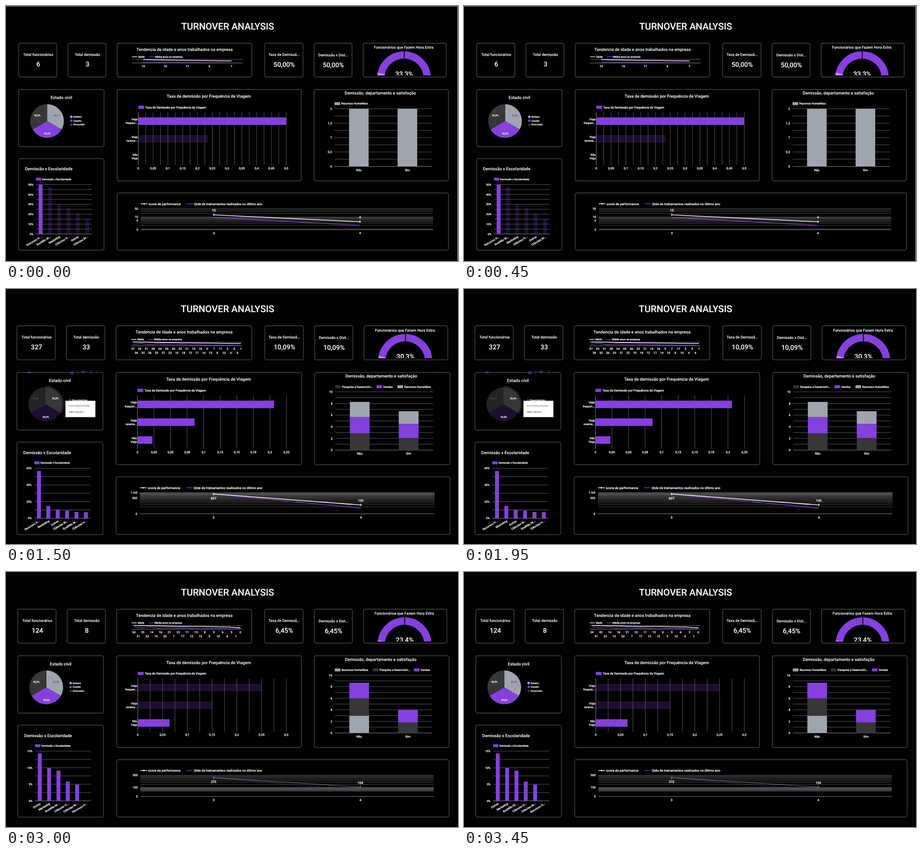
Write an HTML page that moves like this. It is 996 by 562 pixels and loops after 3750 ms.

```html
<!DOCTYPE html>
<html lang="pt">
<head>
<meta charset="utf-8">
<title>Turnover Analysis</title>
<style>
html, body { margin: 0; width: 100%; height: 100%; overflow: hidden; background: #020202; }
svg { display: block; width: 996px; height: 562px; font-family: Roboto, sans-serif; text-rendering: geometricPrecision; }
</style>
</head>
<body>
<svg id="stage" viewBox="0 0 996 562"></svg>
<script>
const HOLD = 750;
const PAL = { p: '#8540de', g: '#a0a4af', d: '#373737' };
const DIM = 0.22;
const GRID = '#5a5a5a', AXIS = '#8a8a8a';
const STATUS = { p: 'Casado', g: 'Solteiro', d: 'Divorciado' };
const DEPT = {
  p: ['Vendas', 46],
  g: ['Recursos HumaNãos', 83.5],
  d: ['Pesquisa e Desenvolvi...', 90]
};
const TRAVEL = { f: ['Viaja', 'frequen...'], r: ['Viaja', 'rarame...'], n: ['Não', 'Viaja'] };
const SCHOOL = { R: 'Recursos H...', E: 'EnsiNão M...', M: 'Marketing', H: 'Ciências H...', C: 'Ciências M...', O: 'Outras' };

// view: x, y of the first card and scale; trend rows alternate along the axis
const VIEWS = [
  {
    view: [28, 82, 1, 1], edge: true,
    kpi: ['6', '3', '50,00%', '50,00%'], gauge: 33.3,
    ages: ['14 10 11 6 1'], age: [118.2, 119.2, 119.8, 120.4, 121], years: [123.6, 124.2, 124.2, 124.9, 125.2],
    pie: 'gpd',
    bars: { max: .5, step: .05, minor: 2, rows: 'frn', vals: [.5, .2354, 0], lit: 'f' },
    stack: { max: 2, step: .5, grid: 8, order: 'g', vals: [[2], [2]] },
    school: { max: 50, step: 10, keys: 'REMHOC', vals: [50, 47.5, 30, 26, 21, 15], lit: 'R' },
    score: { top: 50, dec: 26.5, min: 1, sub: 1, marks: { 50: '50', 10: '10', 5: '5' }, pts: [15, 4], names: ['15', '4'], up: true, train: [9.2, 2] }
  },
  {
    view: [28, 80, 1.0032, 1.0044],
    kpi: ['1.470', '237', '16,12%', '16,12%'], gauge: 28.3,
    ages: ['38 37 30 35 34 31 29 27 24 25 22 18 16 12 13 9 8 6 3 1', '40 36 33 28 32 26 23 21 20 19 17 15 14 10 11 7 5 4 2 0'],
    age: [117.6, 117.8, 118.2, 118.5, 119, 119.3, 119.7, 120, 120.4, 120.7, 122.8],
    years: [120.8, 121.2, 123, 122.4, 123.4, 122, 123.6, 123.2, 123.8, 123.5, 124, 124.3, 124, 124.6, 124.5, 125, 125.2],
    pie: 'dpg',
    bars: { max: .25, step: .025, minor: 1, rows: 'frn', vals: [.249, .15, .08], lit: 'frn' },
    stack: { max: 10, step: 2, grid: 10, order: 'dgp', vals: [[2.78, 2.77, 2.7], [2.5, 2.3, 2.42]] },
    school: { max: 30, step: 10, keys: 'REMHCO', vals: [25.9, 24.3, 22, 14.6, 13.4, 13.2] },
    score: { top: 5000, dec: 37.9, min: 600, sub: 2, marks: { 5000: '5 mil', 1000: '1 mil' }, pts: [3732, 904], names: ['3.732', '904'], train: [3550, 620] }
  },
  {
    view: [24, 81, 1.0079, 1.0088],
    kpi: ['327', '33', '10,09%', '10,09%'], gauge: 30.3,
    ages: ['37 33 31 28 24 25 20 23 21 13 16 9 7 11 3 5 1', '34 32 26 29 27 22 19 18 12 17 14 15 8 10 4 6'],
    age: [117.4, 118, 118.8, 119.2, 119.5, 120, 120.3, 120.8],
    years: [122.6, 120.6, 123.2, 121.8, 123, 123.4, 122.8, 124, 123.6, 124.4, 124.2, 124.8, 124.6, 125.2],
    pie: 'dpg', hover: true,
    bars: { max: .225, step: .025, minor: 1, rows: 'frn', vals: [.206, .0862, .0226], lit: 'frn' },
    stack: { max: 10, step: 2, grid: 10, order: 'dpg', vals: [[2.88, 2.79, 2.61], [2.07, 2.43, 2.18]] },
    school: { max: 60, step: 20, keys: 'RMOCEH', vals: [56.8, 14.7, 10.3, 9.2, 7.6, 7.4] },
    score: { top: 1000, dec: 37.7, min: 150, sub: 2, marks: { 1000: '1 mil', 500: '500' }, pts: [837, 192], names: ['837', '192'], train: [815, 125] },
    tools: [55.8, 189.7, 184.1], tip: 'pie'
  },
  {
    view: [26, 79.5, 1.0063, 1.0077],
    kpi: ['8', '8', '100,00%', '100,00%'], gauge: 62.5,
    ages: ['3 6 19 7 21 17 10 1'], age: [117.4, 119.6, 119.9, 120.2, 120.4, 120.8, 121, 121.8],
    years: [125, 124.6, 125, 124.8, 122.8, 124.8, 124.4, 125.2],
    pie: 'pdg', hover: true,
    bars: { max: 1, step: .1, minor: 2, rows: 'nrf', vals: [1, 1, 1], lit: 'f' },
    stack: { max: 8, step: 2, grid: 8, order: 'pdg', vals: [[3.4, 2.57, 0], [2.95, 2.63, 2.42]], lit: '11' },
    school: { max: 100, step: 20, keys: ['Ciências Humanas', 'Ciências Médicas'], vals: [100, 100] },
    score: { top: 50, dec: 32, min: 4, sub: 2, marks: { 50: '50', 10: '10', 5: '5' }, pts: [21, 4], names: ['21', '4'], train: [21, 0] },
    tools: [709.7, 938.3, 174.8], tip: 'stack'
  },
  {
    view: [26, 82, 1.0037, 1.0044],
    kpi: ['124', '8', '6,45%', '6,45%'], gauge: 23.4,
    ages: ['34 33 14 16 21 22 11 15 8 5 6 3 0', '31 23 19 20 7 17 12 13 9 10 4 1'],
    age: [117.6, 118.1, 118.6, 119.4, 119.8, 120, 120.2, 120.5, 121, 123],
    years: [121, 122.6, 121, 123.6, 122.8, 123.4, 123.2, 124.2, 125, 123.8, 124.6, 124.4, 125.2, 125],
    pie: 'gpd',
    bars: { max: .3, step: .05, minor: 2, rows: 'frn', vals: [.25, .15, .064], lit: 'n' },
    stack: { max: 10, step: 2, grid: 10, order: 'gdp', vals: [[2.97, 3.01, 2.69], [0, 1.8, 2.18]] },
    school: { max: 15, step: 5, keys: 'OMEHCR', vals: [14.3, 9.9, 9.1, 5.8, 4.9, 0] },
    score: { top: 500, dec: 37.9, min: 60, sub: 2, marks: { 500: '500', 100: '100' }, pts: [372, 104], names: ['372', '104'], train: [365, 66], faint: true }
  }
];

const num = v => String(Math.round(v * 100 + 1e-6) / 100).replace('.', ',');
const range = (n, fn) => Array.from({ length: n }, (_, i) => fn(i)).join('');

// y is the middle of the capitals; a hairline stroke thickens light text
function text(s, x, y, size, o = {}) {
  const { at = 'middle', fill = '#fff', w = 500, more = '' } = o;
  const edge = w === 500 ? `stroke="${fill}" stroke-width="${size < 8 ? .22 : .1}"` : '';
  return `<text x="${x}" y="${y + size * .355}" font-size="${size}" text-anchor="${at}" fill="${fill}" font-weight="${w}" ${edge} ${more}>${s}</text>`;
}
const rect = (x, y, w, h, fill, more = '') =>
  `<rect x="${x}" y="${y}" width="${w}" height="${h}" fill="${fill}" ${more}/>`;
const line = (x1, y1, x2, y2, c = GRID, w = 1) =>
  `<line x1="${x1}" y1="${y1}" x2="${x2}" y2="${y2}" stroke="${c}" stroke-width="${w}"/>`;
const poly = (pts, c, w) =>
  `<polyline points="${pts.map(p => p.join()).join(' ')}" fill="none" stroke="${c}" stroke-width="${w}" stroke-linejoin="round"/>`;
const dot = (x, y, r, fill, more = '') => `<circle cx="${x}" cy="${y}" r="${r}" fill="${fill}" ${more}/>`;
const card = (x, y, w, h) => rect(x, y, w, h, '#000', 'rx="4" stroke="#383838" stroke-width="1.9"');
const faded = on => on ? '' : `opacity="${DIM}"`;

function cards() {
  const top = [[28, 84], [136.4, 84], [245, 296.5], [570, 84.5], [679, 83.5], [787, 183]];
  return top.map(([x, w]) => card(x, 82, w, 74.5)).join('') +
    card(28, 184, 188, 126) + card(28, 336.3, 188, 202) +
    card(245, 184, 405.7, 201.5) + card(679, 184, 296, 201.5) + card(245, 412, 730, 126);
}

function kpis(v) {
  const spots = [['Total funcionários', 71, 106.7], ['Total demissão', 179.5, 106.7],
    ['Taxa de Demissã...', 613, 107.2], ['Demissão x Dist...', 721.3, 108.3]];
  return spots.map(([name, x, y], i) =>
    text(name, x, y, 8.2) + text(v[i], x, y + 21.5, 14.5)).join('');
}

function gauge(pct) {
  const cx = 877, cy = 159, r = 51;
  const arc = (a, b, c) => {
    const p = d => [cx - r * Math.cos(d * Math.PI / 180), cy - r * Math.sin(d * Math.PI / 180)].join();
    return `<path d="M${p(a)}A${r},${r} 0 0 1 ${p(b)}" fill="none" stroke="${c}" stroke-width="16"/>`;
  };
  return text('Funcionários que Fazem Hora Extra', 876.5, 91.5, 8.25) +
    `<g clip-path="url(#dial)">` + arc(0, 180, PAL.p) + arc(0, pct * .352, '#c987f2') +
    line(cx + .5, 99, cx + .5, 117, '#000', 1.8) +
    text(num(pct) + '%', cx + .5, 149.3, 14.9) + '</g>';
}

function trend(v) {
  const x0 = 278, w = 243.5;
  const rows = v.ages.map(r => r.split(' '));
  const n = rows.flat().length, slot = w / n;
  const spread = ys => ys.map((y, i) => [x0 + slot / 2 + i / (ys.length - 1) * (w - slot), y]);
  let s = text('Tendencia de idade e anos trabalhados na empresa', 393.5, 95.5, 9.22) +
    line(278, 112, 289, 112, '#fff', 1.4) + text('Idade', 291, 112, 5.9, { at: 'start' }) +
    line(315, 112, 326, 112, PAL.p, 1.4) + text('Média anos na empresa', 328, 112, 5.7, { at: 'start' }) +
    line(x0, 117.6, x0 + w, 117.6, '#666') + line(x0, 125.7, x0 + w, 125.7, AXIS);
  rows.forEach((row, r) => row.forEach((t, i) => {
    s += text(t, x0 + slot * (i * rows.length + r + .5), 132.7 + r * 8.3, 6.5);
  }));
  return s + poly(spread(v.years), PAL.p, 1.2) + poly(spread(v.age), '#fff', 1.5);
}

function pie(v) {
  const cx = 90.5, cy = 253.5;
  const sector = (i, r, fill, more) => {
    const p = k => [cx + r * Math.sin(k * Math.PI / 1.5), cy - r * Math.cos(k * Math.PI / 1.5)].join();
    return `<path d="M${cx},${cy}L${p(i)}A${r},${r} 0 0 1 ${p(i + 1)}Z" fill="${fill}" ${more}/>`;
  };
  const at = [[112, 241], [91, 281.5], [69, 241]];
  let s = text('Estado civil', 122, 202, 9.3);
  if (v.hover && v.tip === 'pie') s += sector(0, 40.5, '#1c1c1c', '');
  [...v.pie].forEach((k, i) => {
    const on = !v.hover || k === 'd';
    const ink = k !== 'g' ? '#fff' : on ? '#686b74' : '#4b4b4b';
    const y = 244.2 + i * 8.5;
    s += sector(i, 37, PAL[k], faded(on)) + text('33,3%', ...at[i], 5.3, { fill: ink }) +
      dot(144, y, 2.8, PAL[k], faded(on)) +
      text(STATUS[k] + (v.hover && k === 'd' ? '(inc...' : ''), 148.4, y, 5.3, { at: 'start' });
  });
  return s;
}

function travel({ max, step, minor, rows, vals, lit }) {
  const x0 = 291.5, w = 326, n = Math.round(max / step);
  let s = text('Taxa de demissão por Frequência de Viagem', 447, 199.1, 9.25) +
    rect(x0, 219.6, 12.8, 7, PAL.p) +
    text('Taxa de Demissão por Frequência de Viagem', 307, 223.2, 6.68, { at: 'start' }) +
    range(n * minor + 1, i => {
      const x = x0 + w * i / (n * minor);
      return line(x, 234, x, 350.5, i ? GRID : AXIS);
    }) +
    range(n + 1, i => text(num(i * step), x0 + w * i / n, 357.7, 6.8));
  [...rows].forEach((k, i) => {
    const y = 253.8 + i * 38.9;
    s += rect(x0, y - 8.2, w * vals[i] / max, 16.4, PAL.p, faded(lit.includes(k))) +
      TRAVEL[k].map((t, j) => text(t, 290.3, y - 4.2 + j * 8.4, 6.2, { at: 'end' })).join('');
  });
  return s;
}

function stack({ max, step, grid, order, vals, lit }) {
  const y0 = 353.5, h = 127;
  let s = text('Demissão, departamento e satisfação', 824.8, 192, 9.25), x = 724;
  for (const k of order) {
    s += rect(x, 212, 12.3, 6.4, PAL[k]) + text(DEPT[k][0], x + 14.8, 215.2, 6.2, { at: 'start' });
    x += DEPT[k][1];
  }
  s += range(grid + 1, i => {
    const y = y0 - h * i / grid;
    return line(724, y, 938, y, i ? GRID : AXIS);
  }) + range(Math.round(max / step) + 1, i => text(num(i * step), 718.3, y0 - h * i * step / max, 6.8, { at: 'end' }));
  vals.forEach((col, c) => {
    let y = y0;
    const cx = 777.5 + c * 107;
    col.forEach((v, i) => {
      const bh = h * v / max;
      y -= bh;
      s += rect(cx - 21.6, y, 43.2, bh, PAL[order[i]], faded(!lit || lit === `${c}${i}`));
    });
    s += text(['Não', 'Sim'][c], cx, 361.3, 6.5);
  });
  return s;
}

function school({ max, step, keys, vals, lit }) {
  const x0 = 66, w = 123, y0 = 502.5, h = 109;
  const n = vals.length, slot = w / n, ticks = max / step;
  let s = text('Demissão x Escolaridade', 42, 359, 9.3, { at: 'start' }) +
    rect(x0, 378.4, 11.6, 6.2, PAL.p) + text('Demissão x Escolaridade', 79.6, 381.6, 5.7, { at: 'start' }) +
    range(ticks * 2 + 1, i => {
      const y = y0 - h * i / ticks / 2;
      return line(x0, y, x0 + w, y, i ? GRID : AXIS);
    }) +
    range(ticks + 1, i => text(i * step + '%', 60.3, y0 - h * i / ticks, 6.2, { at: 'end' }));
  vals.forEach((v, i) => {
    const cx = x0 + slot * (i + .5), bw = slot * .42, k = keys[i];
    s += rect(cx - bw / 2, y0 - h * v / max, bw, h * v / max, PAL.p, faded(!lit || lit === k));
    s += SCHOOL[k]
      ? text(SCHOOL[k], 0, 0, 6.3, { at: 'end', more: `transform="translate(${cx + 1.5},508) rotate(-31)"` })
      : text(k, cx, 509.5, 6.3);
  });
  return s;
}

function score({ top, dec, min, sub, marks, pts, names, up, train, faint }) {
  const x0 = 297, w = 644, xs = [458, 780], base = 493;
  const y = v => v > 0 ? 446.5 + dec * Math.log10(top / v) : base;
  let s = line(x0, 436, x0 + 15, 436, '#fff', 1.4) + dot(304.5, 436, 1.7, '#fff') +
    text('score de performance', 314.3, 436, 7.2, { at: 'start' }) +
    line(398, 436, 411.5, 436, PAL.p, 1.4) +
    text('Qtde de treinamentos realizados no último ano', 414.3, 436, 7.2, { at: 'start' });
  for (let v = top; v >= min - .01; v -= 10 ** Math.floor(Math.log10(v - .001)) / sub)
    s += line(x0, y(v), x0 + w, y(v), GRID, .9);
  s += line(x0, base, x0 + w, base, AXIS);
  for (const m in marks) s += text(marks[m], 291.3, y(+m), 6.6, { at: 'end' });
  s += text('0', 291.3, base, 6.6, { at: 'end' });
  const curve = (vals, c, lw) => poly(vals.map((v, i) => [xs[i], y(v)]), c, lw);
  s += `<g ${faint ? 'opacity=".3"' : ''}>` + curve(train, PAL.p, 1.4) + curve(pts, '#fff', 1.5) + '</g>';
  pts.forEach((v, i) => {
    const py = y(v), ly = py + (i || up ? -9.7 : 9.7);
    s += line(xs[i], py, xs[i], (py + ly) / 2, '#aaa', .6) +
      (faint ? dot(xs[i], py, i ? 1.2 : 2.3, i ? '#999' : PAL.p) : dot(xs[i], py, 1.7, '#fff')) +
      text(names[i], xs[i], ly, 7.1) + text(['3', '4'][i], xs[i], 501, 7);
  });
  return s;
}

function tools(x0, x1, y) {
  const c = '#7436c8', f = x1 - 17;
  return `<g stroke="${c}" fill="none"><path d="M${x0 - 3.5},${y - 2.5}v3.5h3.5M${x0 - 3},${y + .5}q4,-4 7.5,1.5" stroke-width="1.3"/>` +
    `<path d="M${f - 4},${y - 2.4}h8M${f - 2.5},${y}h5M${f - 1},${y + 2.4}h2" stroke-width="1.2"/></g>` +
    text('AZ', x1 - 42, y - .6, 6, { fill: c }) + line(x1 - 46, y + 3.4, x1 - 38, y + 3.4, c, .9) +
    line(x1 - 29.5, y - 5, x1 - 29.5, y + 5, '#3c3c3c') +
    range(3, i => dot(x1, y - 2.9 + i * 2.9, .95, c));
}

function tip(kind) {
  const o = { at: 'start', fill: '#666', w: 400 }, bold = { ...o, w: 700 };
  const box = (x, y, w, h) => rect(x, y, w, h + .8, '#8a8a8a') + rect(x, y, w, h, '#fff');
  if (kind === 'pie') return box(134.2, 246, 65.4, 35.2) +
    text('Divorciado(incluído)', 141, 256.9, 5.35, o) + text('100% (33,3%)', 141, 270.4, 5.35, bold);
  return box(731.6, 220.5, 122.2, 35.6) + text('Sim', 738.4, 230.8, 6.6, bold) +
    text('Pesquisa e Desenvolvimento: <tspan font-weight="700">2,63</tspan>', 738.4, 244.5, 6.75, o);
}

function scene(v) {
  const [x, y, sx, sy] = v.view;
  return '<defs><clipPath id="dial"><rect x="800" y="95" width="160" height="58"/></clipPath></defs>' +
    (v.edge ? rect(0, 0, 996, 1, '#8a8a8a') + rect(995, 0, 1, 562, '#c8c8c8') : '') +
    `<g transform="translate(${x},${y}) scale(${sx},${sy}) translate(-28,-82)">` +
    text('TURNOVER ANALYSIS', 488.5, 45, 20.65) + cards() + kpis(v.kpi) + trend(v) + gauge(v.gauge) +
    pie(v) + travel(v.bars) + stack(v.stack) + school(v.school) + score(v.score) +
    (v.tools ? tools(...v.tools) : '') + (v.tip ? tip(v.tip) : '') + '</g>';
}

const stage = document.getElementById('stage');
let shown = -1;
function draw(now) {
  const i = Math.floor(now / HOLD) % VIEWS.length;
  if (i !== shown) stage.innerHTML = scene(VIEWS[shown = i]);
}
function tick() {
  draw(performance.now());
  requestAnimationFrame(tick);
}
tick();
</script>
</body>
</html>
```
